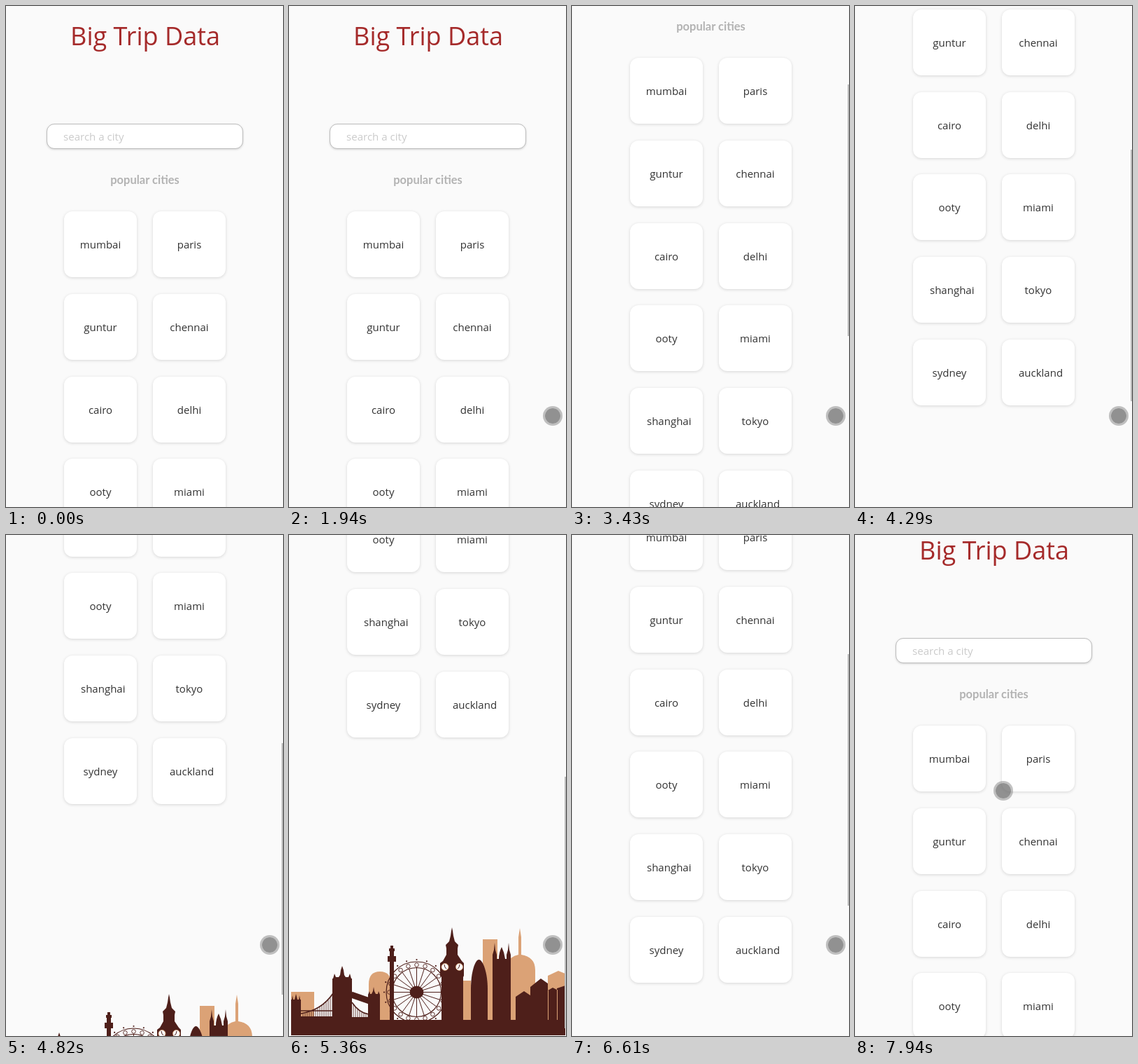
An HTML page for the animation above (8 s loop, 396x715 px).

```html
<!DOCTYPE html>
<html lang="en">
<head>
<meta charset="utf-8">
<title>Big Trip Data</title>
<style>
  html, body { margin: 0; width: 100%; height: 100%; overflow: hidden; background: #fafafa; }
  #stage { position: relative; width: 396px; height: 715px; overflow: hidden; background: #fafafa; }
  #page { position: absolute; left: 0; top: 0; width: 396px; height: 1405px; }
  #page > * { position: absolute; margin: 0; box-sizing: border-box; white-space: nowrap; }
  h1 { left: 0; top: 13px; width: 398px; text-align: center; color: brown;
       font: 400 36px/60px "Comic Sans MS", "Open Sans", sans-serif; }
  .search { left: 58px; top: 168px; width: 281px; height: 36px; padding-left: 23px;
            background: #fff; border: 1px solid #bdbdbd; border-radius: 11px;
            box-shadow: 0 1px 3px rgba(0, 0, 0, .16); color: #cbcbcb;
            font: 15.1px/35px "Open Sans", sans-serif; }
  h2 { left: 0; top: 238px; width: 397px; text-align: center; color: #b3b3b3;
       font: 700 16.5px/21px Lato, sans-serif; }
  .card { width: 104px; height: 94px; border-radius: 12px; background: #fff;
          box-shadow: 0 1px 4px rgba(0, 0, 0, .15); color: #333; text-align: center;
          font: 15px/95px "Open Sans", sans-serif; }
  .card.long { padding-left: 24px; text-align: left; }
  #city { left: 0; top: 1237px; }
  #bar { position: absolute; left: 394px; top: 0; width: 2px; height: 359px; background: #bdbdbd; }
  #cursor { position: absolute; left: -14px; top: -14px; width: 22px; height: 22px; border-radius: 50%;
            border: 3px solid rgba(120, 120, 120, .45); background: rgba(100, 100, 100, .7);
            background-clip: padding-box; }
</style>
</head>
<body>
<div id="stage">
  <div id="page">
    <h1>Big Trip Data</h1>
    <div class="search">search a city</div>
    <h2>popular cities</h2>
    <svg id="city" width="396" height="168" viewBox="0 550 396 168">
      <g fill="#dba276">
        <path d="M3 652h33v40h-33zM249 636h11v56h-11zM277 577h21v115h-21z"/>
        <path d="M114 692V641q0-18 16-18t16 18v51z"/>
        <path d="M317 692v-88q5-4 11-5V574l2-13 2 13v25c13 2 20 9 20 22v71z"/>
        <path d="M370 692v-63l15-7 10 4v66z"/>
      </g>
      <g id="wheel" fill="none" stroke="#4e1f1a"></g>
      <g fill="none" stroke="#4e1f1a">
        <path stroke-width="1.6" d="M17 683Q47 678 63 654M17 679h46M90 667Q100 682 114 684"/>
        <path id="hangers" stroke-width=".8"/>
        <path stroke-width="9" d="M89 656l26 9"/>
      </g>
      <g fill="#4e1f1a">
        <path d="M3 692h392v22H3zM17 687h46v6H17zM90 688h24v5H90z"/>
        <path d="M3 692v-29h1l1-6 1 6h2l1-4 1-4 1 4 1 4h2l1-6 1 6h1v29z"/>
        <path d="M62 692v-59h1l2-7 2 5h4l2-3 1-7 2-6 2 6 1 7 2 3h4l2-5 2 7h1v59z"/>
        <path d="M113 692v-36l2-5 1 4h2l2-4 1-6 1 6 2 4h3l1-4 2 5v36z"/>
        <path d="M144 692v-83h-3v-8h3v-7h-1v-4h2v-4h4v4h2v4h-1v7h3v8h-3v83z"/>
        <path d="M218 692v-61l-2-2v-18l4-3 5-9v-9l-1-5 5-5 2-8 1-7 1-5 1 5 1 7 2 8 5 5-1 5v9l6 9 3 3v18l-1 2v61z"/>
        <path d="M260 692v-44c0-24 6-42 11.500-42S284 624 284 648v44z"/>
        <path d="M291 692v-93l2-7 1-10 1 10 2 7v6h3q0-9 4-17 4 8 5 17h2v-6l2-7 1-10 1 10 2 7v93z"/>
        <path d="M324 692v-33l12-8 9 6v-12l15-12 10 7v10l7-4 6 3v-2l12-4v49z"/>
      </g>
      <path d="M370.500 650v42M383.500 649v43" stroke="#dba276" stroke-width="1"/>
      <g fill="#fafafa" stroke="#dba276" stroke-width=".8">
        <circle cx="223" cy="616.500" r="5"/><circle cx="243.500" cy="616.500" r="5"/>
      </g>
      <path d="M222 613l1 4 2 2M244 613l-1 4-2 2" fill="none" stroke="#4e1f1a"/>
    </svg>
  </div>
  <div id="bar"></div>
  <div id="cursor"></div>
</div>
<script>
  const byId = id => document.getElementById(id);
  const page = byId('page'), bar = byId('bar'), cursor = byId('cursor');

  const names = ['mumbai', 'paris', 'guntur', 'chennai', 'cairo', 'delhi',
                 'ooty', 'miami', 'shanghai', 'tokyo', 'sydney', 'auckland'];
  names.forEach((name, i) => {
    const card = document.createElement('div');
    card.className = name.length > 7 ? 'card long' : 'card';
    card.textContent = name;
    card.style.left = (i % 2 ? 210 : 83) + 'px';
    card.style.top = Math.round(293 + 117.8 * (i >> 1)) + 'px';
    page.append(card);
  });

  // Ferris wheel: rims, spokes and cabins around one hub
  const cx = 182.5, cy = 652.5;
  const ring = (r, w) => `<circle cx="${cx}" cy="${cy}" r="${r}" stroke-width="${w}"/>`;
  let wheel = ring(43.5, 1.2) + ring(35, 1.2);
  for (let i = 0; i < 20; i++) {
    const a = i * Math.PI / 10, c = Math.cos(a), s = Math.sin(a);
    wheel += `<path d="M${cx} ${cy}l${35 * c} ${35 * s}"/>`
      + `<circle cx="${cx + 39 * c}" cy="${cy + 39 * s}" r="2.8" stroke-width=".9"/>`
      + `<circle cx="${cx + 46.5 * c}" cy="${cy + 46.5 * s}" r="1.1" fill="#4e1f1a" stroke="none"/>`;
  }
  wheel += `<ellipse cx="${cx}" cy="${cy}" rx="10" ry="9" fill="#4e1f1a" stroke="none"/>`;
  byId('wheel').innerHTML = wheel;

  let hangers = '';
  for (let x = 20; x < 63; x += 3) hangers += `M${x} ${683 - 28 * ((x - 17) / 46) ** 2}V688`;
  for (let x = 92; x < 114; x += 3) hangers += `M${x} ${684 - 17 * ((114 - x) / 24) ** 2}V689`;
  byId('hangers').setAttribute('d', hangers);

  const linear = p => p;
  const sine = p => .5 - .5 * Math.cos(Math.PI * p);
  const out = p => 1 - (1 - p) ** 2;

  // Each move: first step time, last step time, step count, end value, easing
  const scrollMoves = [
    [2420, 3030, 9, 91, linear],
    [3210, 3810, 9, 401, sine],
    [4290, 4980, 10, 612, sine],
    [5130, 5440, 5, 690, out],
    [5910, 6610, 10, 337, sine],
    [6940, 7240, 5, 21, sine]
  ];
  const xMoves = [[210, 610, 6, 377], [990, 990, 1, 375], [1160, 1160, 1, 377], [7640, 7940, 5, 212]];
  const yMoves = [[210, 610, 6, 588], [990, 990, 1, 586], [1160, 1160, 1, 588],
                  [1940, 1940, 1, 585], [7640, 7940, 5, 365]];

  function along(t, value, moves) {
    for (const [t0, t1, n, to, ease = linear] of moves) {
      if (t < t0) break;
      const step = Math.min(n, Math.floor((t - t0) / (t1 - t0 || 1) * (n - 1) + .1) + 1);
      value += (to - value) * ease(step / n);
    }
    return value;
  }

  const shown = on => on ? 'visible' : 'hidden';
  const start = performance.now();

  function draw() {
    const t = (performance.now() - start) % 8000;
    const scroll = Math.round(along(t, 0, scrollMoves));
    page.style.transform = `translateY(${-scroll}px)`;
    bar.style.transform = `translateY(${Math.round(2.5 + scroll * .498)}px)`;
    bar.style.visibility = shown(t >= 2270 && t < 7640);
    cursor.style.transform = `translate(${along(t, 358, xMoves)}px, ${along(t, 701, yMoves)}px)`;
    cursor.style.visibility = shown(t >= 210);
    requestAnimationFrame(draw);
  }
  draw();
</script>
</body>
</html>
```
